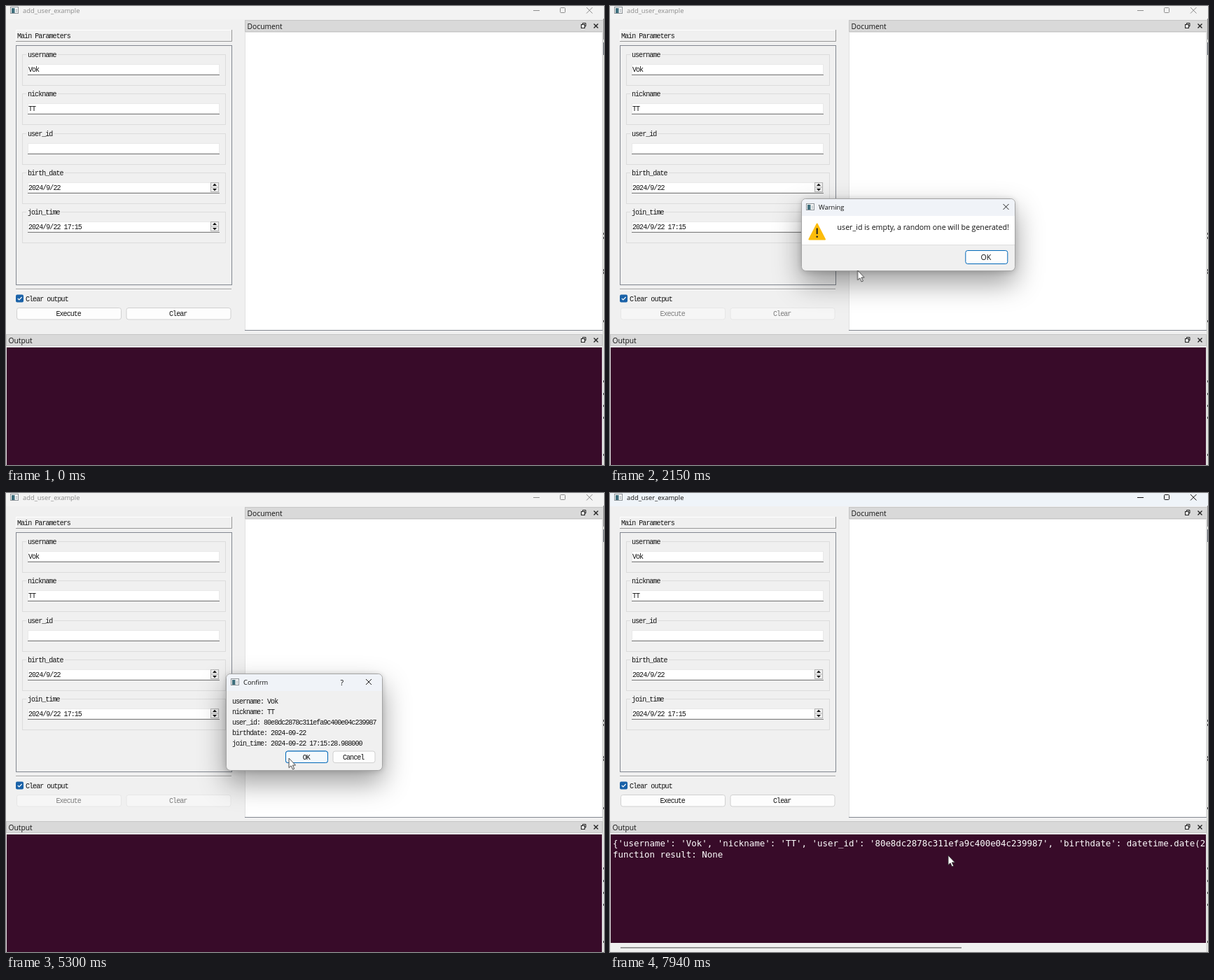
An HTML page that plays this animation: 854 by 656 pixels, repeating every 8 s.

```html
<!DOCTYPE html>
<html lang="en">
<head>
<meta charset="utf-8">
<title>add_user_example</title>
<style>
html, body { margin: 0; width: 100%; height: 100%; overflow: hidden; background: #f0f0f0; }
svg { display: block; width: 854px; height: 656px; }
text { white-space: pre; fill: #111; }
.ui { font: 10.3px "Open Sans", "Noto Sans", sans-serif; }
.msg { font: 10.62px "Open Sans", "Noto Sans", sans-serif; }
.cap { font: 9.35px "Open Sans", "Noto Sans", sans-serif; }
.mono { font: 10px "Liberation Mono", monospace; letter-spacing: -.94px; }
.tight { letter-spacing: -.99px; }
.term { font: 12.45px "DejaVu Sans Mono", monospace; fill: #fff; }
.mid { text-anchor: middle; }
.dialog { transform-box: fill-box; transform-origin: center; opacity: 0;
  filter: drop-shadow(0 1px 4px rgba(0, 0, 0, .16)) drop-shadow(0 17px 19px rgba(0, 0, 0, .38)); }
.late { opacity: 0; }
</style>
</head>
<body>
<svg id="stage" viewBox="0 0 854 656"></svg>
<script>
const LOOP = 8000;
const USER = 'Vok', UID = '80e8dc2878c311efa9c400e04c239987';

// ---- drawing helpers ----
const rect = (x, y, w, h, fill, stroke = 'none', rx = 0) =>
  `<rect x="${x}" y="${y}" width="${w}" height="${h}" rx="${rx}" fill="${fill}" stroke="${stroke}"/>`;
const path = (d, stroke, width = 1, fill = 'none') =>
  `<path d="${d}" stroke="${stroke}" stroke-width="${width}" fill="${fill}"/>`;
const text = (x, y, s, cls = 'mono', fill = '') =>
  `<text x="${x}" y="${y}" class="${cls}"${fill && ` style="fill:${fill}"`}>${s}</text>`;
const group = (id, body, cls = '') => `<g id="${id}" class="${cls}">${body}</g>`;
const cross = (x, y, s, color, w = 1) =>
  path(`M${x} ${y}l${s} ${s}M${x + s} ${y}l${-s} ${s}`, color, w);
const appIcon = (x, y) =>
  rect(x + .5, y + .5, 11, 9, '#f8f8f8', '#8c9297') + rect(x + 2, y + 2, 4.5, 7, '#3f6f7d') +
  rect(x + 8, y + 3, 2, 5, '#c9ced2');

function button(cx, y, w, h, label, stroke, cls = 'mono', fill = '#fdfdfd', color = '') {
  return rect(cx - w / 2, y, w, h, fill, stroke, 3) +
    text(cx - .8, y + h / 2 + 3.6, label, cls + ' mid', color);
}

function dock(x, y, w, title) {
  const r = 820;
  return rect(x + .5, y + .5, w - 1, 16, '#d9d9d9', '#c6c6c6') +
    text(x + 3.5, y + 12.5, title, 'ui') +
    path(`M${r + 3.5} ${y + 6}v-1.5h4.5v4.5h-1.5`, '#222') +
    rect(r + 1.5, y + 6.5, 5, 5, '#e6e6e6', '#222') +
    cross(839.5, y + 5.5, 6, '#222', 1.4);
}

function field(y, label, value, spin) {
  let s = rect(23.5, y + .5, 290, 44, 'none', '#dcdcdc') +
    rect(29, y - 3, label.length * 5.06 + 4, 8, '#f0f0f0') + text(31, y + 4, label) +
    rect(31.5, y + 14.5, 273, 14, '#fff', '#e9e9e9') + path(`M31 ${y + 29.5}h274`, '#7d7d7d') +
    text(32, y + 25, value);
  if (spin) {
    s += rect(292.5, y + 14.5, 11, 13, '#f0f0f0', '#b4b4b4') +
      path(`M292.5 ${y + 21}h11`, '#b4b4b4') +
      path(`M295 ${y + 19}h6l-3 -3.3zM295 ${y + 23}h6l-3 3.3z`, 'none', 0, '#111');
  }
  return s;
}

const titleBar = (color, bg) =>
  rect(0, 0, 854, 19, bg) + appIcon(6, 1) + text(24, 10, 'add_user_example', 'cap', color) +
  path('M753 6.5h9', color) + rect(791.5, 2.5, 7, 7, 'none', color, 1) +
  cross(829, 2, 8.5, color);

const actions = (fill, stroke, color) =>
  button(90, 431.5, 149, 16.5, 'Execute', stroke, 'mono', fill, color) +
  button(246.5, 431.5, 149, 16.5, 'Clear', stroke, 'mono', fill, color);

function dialog(id, x, y, w, h, title, closeX, body) {
  return group(id, rect(x + .5, y + .5, w - 1, h - 1, '#f0f0f0', '#a3a3a3', 6) +
    path(`M${x + 1} ${y + 25}v-18q0 -6 6 -6h${w - 14}q6 0 6 6v18z`, 'none', 0, '#f0f3f8') +
    appIcon(x + 7, y + 7) + text(x + 25, y + 16, title, 'cap') +
    cross(closeX, y + 8, 8, '#222') + body, 'dialog');
}

// Message box with a white panel and one OK button whose states are toggled.
function message(id, x, w, title, icon, msg, msgX, okX) {
  const ok = (fill, color) => button(okX, 349.5, 60, 19, 'OK', '#0067b8', 'msg', fill, color);
  return dialog(id, x, 275, w, 104, title, x + w - 17.5,
    rect(x + 1, 300, w - 2, 41, '#fff') + path(`M${x + 1} 341.5h${w - 2}`, '#dfdfdf') +
    icon + text(msgX, 320, msg, 'msg') + ok('#fdfdfd') +
    group(id + 'Hover', ok('#f3f8fc'), 'late') +
    group(id + 'Press', ok('#cce4f7', '#555'), 'late'));
}

const warnIcon =
  `<path d="M295.7 311.5L307 333.5H284.4Z" fill="#fcbc0b" stroke="#fcbc0b" stroke-width="2" stroke-linejoin="round"/>` +
  path('M295.7 317.5v8.5', '#222', 2) + `<circle cx="295.7" cy="329.7" r="1.3" fill="#222"/>`;
const infoIcon =
  `<circle cx="388.2" cy="322.4" r="13.4" fill="url(#blue)"/>` +
  path('M388.2 320v9', '#fff', 1.8) + `<circle cx="388.2" cy="316.6" r="1.2" fill="#fff"/>`;

const lines = [`username: ${USER}`, 'nickname: TT', `user_id: ${UID}`,
  'birthdate: 2024-09-22', 'join_time: 2024-09-22 17:15:28.988000'];
const confirmOk = (fill, color) => button(429.5, 369, 60, 16.5, 'OK', '#0067b8', 'mono', fill, color);
const confirmBody =
  text(477.5, 274.5, '?', 'msg') +
  lines.map((s, i) => text(323, 301 + i * 15, s, 'mono tight')).join('') +
  confirmOk('#fdfdfd') + group('confirmHover', confirmOk('#f3f8fc'), 'late') +
  group('confirmPress', confirmOk('#cce4f7', '#555'), 'late') +
  button(497, 369, 60, 16.5, 'Cancel', '#d0d0d0');

const fields = [['username', USER], ['nickname', 'TT'], ['user_id', ''],
  ['birth_date', '2024/9/22', 1], ['join_time', '2024/9/22 17:15', 1]];

const form =
  rect(14, 34, 309, 17, '#f0f0f0') + path('M14.5 50V34.5H322', '#fff') +
  path('M14 50.5H322.5V34', '#979797') + text(16, 46, 'Main Parameters') +
  rect(14.5, 56.5, 308, 342, 'none', '#828790') +
  fields.map(([l, v, spin], i) => field(Math.round(69 + i * 56.25), l, v, spin)).join('') +
  path('M14 404.5H322', '#a0a0a0') + path('M14 405.5H322', '#fff') +
  rect(14, 412.5, 11, 11, '#1a62a8', 'none', 2) + path('M16.8 418l2 2 3.8 -4', '#fff', 1.1) +
  text(28, 422, 'Clear output');

const edge = path('M852.5 19V656', '#d2d2d2') + rect(853, 18, 1, 638, '#ecefe6') +
  rect(853, 18, 1, 30, '#8d8d8d') + rect(853, 52, 1, 18, '#606870') +
  [324, 330, 376, 380, 449, 535, 553, 570, 587, 640].map(y => rect(853, y, 1, 3, '#444')).join('');

const result =
  text(4, 504.5, `{'username': '${USER}', 'nickname': 'TT', 'user_id': '${UID}', 'birthdate': datetime.date(2024, 9, 22)`, 'term') +
  text(4, 520.5, 'function result: None', 'term') +
  rect(0, 643, 852, 13, '#f0f0f0') + rect(15, 649, 487, 1.7, '#8a8a8a');

document.getElementById('stage').innerHTML =
  `<defs><linearGradient id="blue" x2="1" y2="1"><stop stop-color="#2aa0ea"/><stop offset="1" stop-color="#0070cc"/></linearGradient>
  <clipPath id="view">${rect(1, 488, 850, 168, '#000')}</clipPath></defs>` +
  rect(0, 0, 854, 656, '#f0f0f0') +
  titleBar('#8c8c8c', '#f3f3f3') + group('active', titleBar('#111', '#eff4f9'), 'late') +
  form + group('enabled', actions('#fdfdfd', '#d0d0d0')) +
  group('disabled', actions('#f6f6f6', '#e6e6e6', '#7c7c7c'), 'late') +
  dock(341, 20, 512, 'Document') +
  rect(341.5, 37.5, 510, 426, '#fff', '#e2e2e2') + path('M341 463.5H852', '#828790') +
  dock(0, 469, 852, 'Output') +
  rect(0, 487, 852, 169, '#e6e6e6') + rect(1, 488, 850, 168, '#380b29') +
  `<g clip-path="url(#view)">${group('result', result, 'late')}</g>` + edge +
  message('warn', 273, 306, 'Warning', warnIcon,
    'user_id is empty, a random one will be generated!', 324.6, 537.8) +
  dialog('confirm', 314, 258, 224, 139, 'Confirm', 514, confirmBody) +
  message('info', 366, 121, 'Information', infoIcon, 'user added!', 417, 445.3) +
  group('pointer',
    group('click', '<circle cx="-.5" cy="0" r="9.5" fill="#f2ee3c" opacity=".68"/>', 'late') +
    `<path d="M0 0V13.6L3.1 10.8L5.5 16L7.7 15L5.3 10H9.5Z" fill="#fff" stroke="#333" stroke-width=".9" stroke-linejoin="round"/>`,
    'late');

// ---- motion ----
const el = id => document.getElementById(id);
const play = (id, frames) => el(id).animate(frames, { duration: LOOP, iterations: Infinity });

// Hard on/off: each pair is [from, to].
function blink(id, ...spans) {
  const frames = [];
  const add = (t, opacity) => frames.push({ offset: t / LOOP, opacity, easing: 'steps(1, end)' });
  if (spans[0][0] > 0) add(0, 0);
  for (const [a, b] of spans) {
    add(a, 1);
    if (b < LOOP) add(b, 0);
  }
  frames.push({ offset: 1, opacity: frames[frames.length - 1].opacity });
  play(id, frames);
}

function popup(id, open, close) {
  const key = (t, opacity, s) => ({ offset: t / LOOP, opacity, transform: `scale(${s})`, easing: 'ease-out' });
  play(id, [key(0, 0, .92), key(open, 0, .92), key(open + 190, 1, 1),
    key(close, 1, 1), key(close + 150, 0, .94), key(LOOP, 0, .94)]);
}

const route = [
  [0, 620, 598], [140, 620, 598], [420, 450, 545], [700, 230, 475], [910, 128, 444], [1050, 113, 434],
  [1720, 113, 434], [1890, 205, 402], [2150, 353.5, 378], [2490, 403, 371],
  [2800, 470, 367], [3080, 520, 364], [3340, 539.5, 363.5],
  [4400, 539.5, 363.5], [4560, 520, 325], [4720, 482, 306], [4900, 435, 318], [5170, 398, 356],
  [5300, 404, 379], [5560, 419, 379.5],
  [6480, 419, 379.5], [6720, 446, 361],
  [7340, 446, 361], [7600, 462, 430], [7800, 477, 500], [7930, 483, 518], [LOOP, 483, 518]
];
play('pointer', route.map(([t, x, y]) => ({ offset: t / LOOP, transform: `translate(${x}px, ${y}px)` })));

blink('pointer', [70, LOOP]);
blink('click', [1260, 1470], [3410, 3810], [5700, 5990], [6860, 7070]);
blink('active', [1260, 1540], [7170, LOOP]);
blink('enabled', [0, 1470], [7170, LOOP]);
blink('disabled', [1470, 7170]);
blink('result', [7170, LOOP]);
blink('warnHover', [3010, 3410]);
blink('warnPress', [3410, 3960]);
blink('confirmHover', [5250, 5700]);
blink('confirmPress', [5700, 6140]);
blink('infoHover', [6640, 6860]);
blink('infoPress', [6860, 7220]);
popup('warn', 1710, 3800);
popup('confirm', 3920, 5980);
popup('info', 6100, 7060);
</script>
</body>
</html>
```
